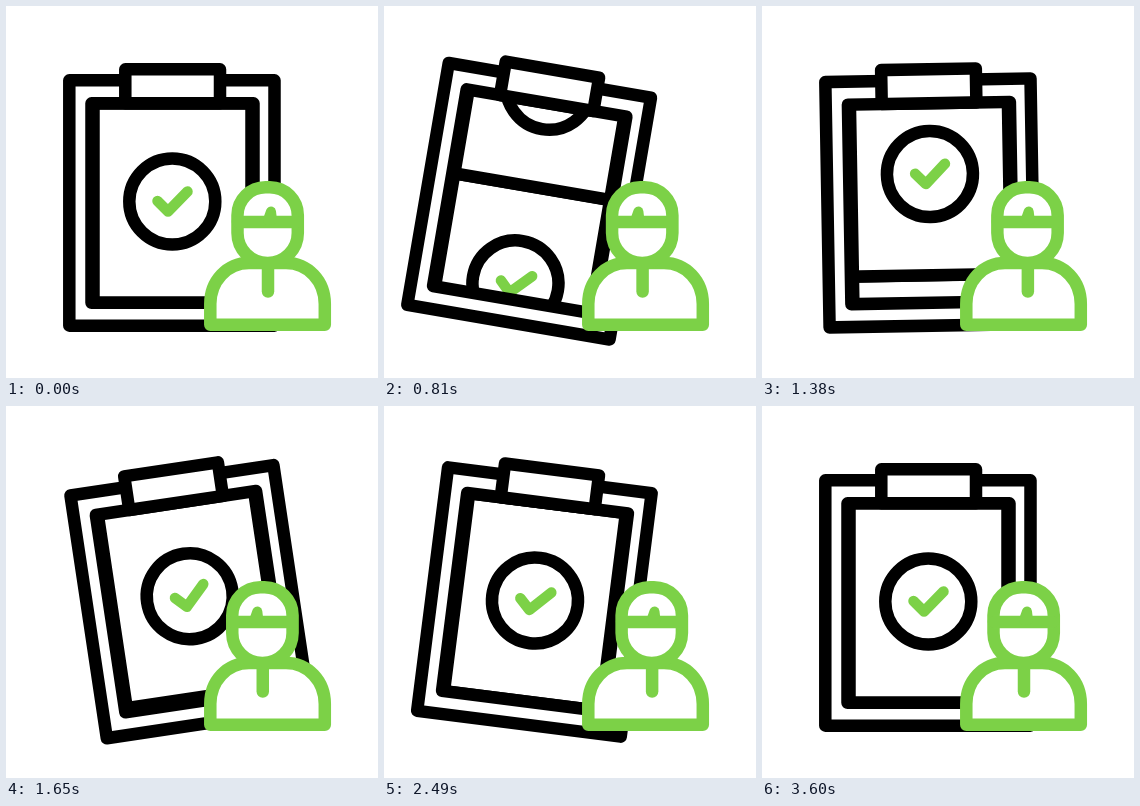
Recreate the animation shown at these times as an HTML page with a canvas. Size 372 by 372 pixels, loop 3.63 s.

```html
<!DOCTYPE html>
<html lang="en">
<head>
<meta charset="utf-8">
<title>Clipboard and worker</title>
<style>
  html, body { margin: 0; width: 100%; height: 100%; overflow: hidden; background: #fff; }
  canvas { display: block; width: 372px; height: 372px; }
</style>
</head>
<body>
<canvas id="stage" width="372" height="372"></canvas>
<script>
const ctx = document.getElementById('stage').getContext('2d');
const LOOP = 3630, STEP = 30;
const BLACK = '#000', GREEN = '#7cd147', WHITE = '#fff';
const PIVOT = { x: 166, y: 74 };
const PAGE = { x: 85.5, y: 97.3, w: 162, h: 199.5 };

ctx.lineCap = ctx.lineJoin = 'round';

const smooth = u => u * u * (3 - 2 * u);

// Eased value through evenly spaced keys; holds the last one.
function track(time, interval, keys) {
  const i = Math.floor(time / interval);
  if (i >= keys.length - 1) return keys[keys.length - 1];
  return keys[i] + (keys[i + 1] - keys[i]) * smooth(time / interval - i);
}

function pen(color, width) {
  ctx.strokeStyle = color;
  ctx.lineWidth = width;
}

function polyline(...points) {
  ctx.beginPath();
  points.forEach(([x, y]) => ctx.lineTo(x, y));
  ctx.stroke();
}

function fillAndStroke() {
  ctx.fillStyle = WHITE;
  ctx.fill();
  ctx.stroke();
}

function box(x, y, w, h) {
  ctx.beginPath();
  ctx.rect(x, y, w, h);
  fillAndStroke();
}

function page(offset) {
  ctx.save();
  ctx.translate(0, offset);
  pen(BLACK, 12.5);
  box(PAGE.x + 2, PAGE.y, PAGE.w - 4, PAGE.h);
  ctx.beginPath();
  ctx.arc(166.3, 195.5, 43, 0, Math.PI * 2);
  ctx.stroke();
  pen(GREEN, 10.5);
  polyline([151.5, 195], [162, 205.5], [181.5, 185.5]);
  ctx.restore();
}

function clipboard(degrees, scroll) {
  ctx.save();
  ctx.translate(PIVOT.x, PIVOT.y);
  ctx.rotate(degrees * Math.PI / 180);
  ctx.translate(-PIVOT.x, -PIVOT.y);

  pen(BLACK, 12.5);
  box(63.3, 74.3, 205.2, 245.4);

  ctx.save();
  ctx.beginPath();
  ctx.rect(PAGE.x, PAGE.y, PAGE.w, PAGE.h);
  ctx.clip();
  page(scroll);
  page(scroll - PAGE.h);
  ctx.restore();

  pen(BLACK, 12.5);
  ctx.strokeRect(PAGE.x, PAGE.y, PAGE.w, PAGE.h);
  box(119.3, 63.3, 94.7, 34);
  ctx.restore();
}

function worker(headShift, badgeShift) {
  pen(GREEN, 12.5);
  ctx.beginPath();
  ctx.moveTo(204.3, 318.8);
  ctx.lineTo(204.3, 298);
  ctx.bezierCurveTo(204.3, 275, 221, 257, 243, 257);
  ctx.lineTo(280, 257);
  ctx.bezierCurveTo(302, 257, 318.8, 275, 318.8, 298);
  ctx.lineTo(318.8, 318.8);
  ctx.closePath();
  fillAndStroke();

  ctx.save();
  ctx.translate(headShift, 0);
  polyline([262, 258], [262, 285.5]);
  ctx.beginPath();
  ctx.roundRect(231.5, 181.3, 60.3, 75.7, [28, 28, 30, 30]);
  fillAndStroke();
  polyline([232, 216], [291, 216]);
  ctx.restore();

  pen(GREEN, 10);
  polyline([262 + badgeShift, 214], [265 + badgeShift, 205.5], [266 + badgeShift, 214]);
}

function draw(now) {
  const time = Math.floor(now % LOOP / STEP) * STEP;
  ctx.fillStyle = WHITE;
  ctx.fillRect(0, 0, 372, 372);
  clipboard(
    track(time, 900, [0, 10, -10, 10, 0]),
    track(time, 1800, [0, PAGE.h])
  );
  worker(
    track(time, 600, [0, -7.5, 7, -7.5, 7, -7.5, 0]),
    track(time, 600, [0, -17.5, 7, -17.5, 7, -17.5, 0])
  );
}

let start;
function tick(now) {
  start ??= now;
  draw(now - start);
  requestAnimationFrame(tick);
}
draw(0);
requestAnimationFrame(tick);
</script>
</body>
</html>
```
